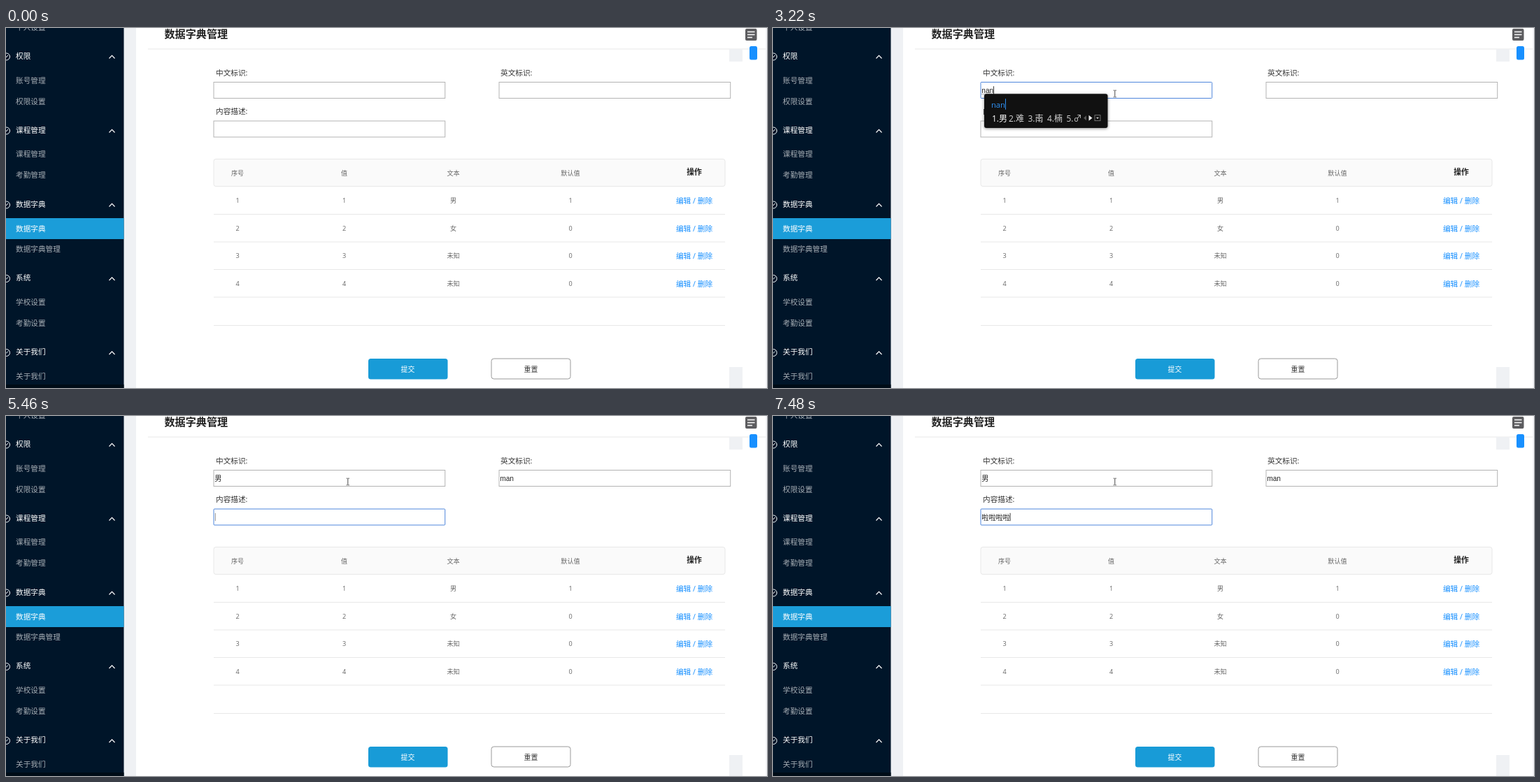
An HTML page that plays this animation: 1088x515 px, repeating every 8 s.

```html
<!DOCTYPE html>
<html lang="zh">
<head>
<meta charset="utf-8">
<title>数据字典管理</title>
<style>
  html, body { margin: 0; width: 100%; height: 100%; overflow: hidden; background: #fff; }
  svg { display: block; width: 100%; height: 100%; }
  text { font-family: "Open Sans", "Noto Sans CJK SC", "Noto Sans CJK", sans-serif; white-space: pre; }
  .input { font-family: "Liberation Sans", "Noto Sans CJK SC", "Noto Sans CJK", sans-serif; }
  .panel { filter: drop-shadow(0 1px 2px rgba(0, 0, 0, .45)); }
</style>
</head>
<body>
<svg id="stage" viewBox="0 0 1088 515" preserveAspectRatio="none"></svg>
<script>
const LOOP = 8000;
const stage = document.getElementById('stage');

const rect = (x, y, w, h, fill, extra = '') =>
  `<rect x="${x}" y="${y}" width="${w}" height="${h}" fill="${fill}" ${extra}/>`;
const hline = (x1, x2, y, color = '#e8e8e8') =>
  `<path d="M${x1} ${y}H${x2}" stroke="${color}"/>`;
// cy is the middle of the glyphs
const text = (x, cy, str, size, fill, extra = '') =>
  `<text x="${x}" y="${cy + size * 0.37}" font-size="${size}" fill="${fill}" ${extra}>${str}</text>`;
const centered = (x, cy, str, size, fill, extra = '') =>
  text(x, cy, str, size, fill, `text-anchor="middle" ${extra}`);

const menu = [
  ['权限', 40, ['账号管理', 75], ['权限设置', 105]],
  ['课程管理', 146, ['课程管理', 180], ['考勤管理', 210]],
  ['数据字典', 252, ['数据字典', 287], ['数据字典管理', 316]],
  ['系统', 357.5, ['学校设置', 392], ['考勤设置', 422]],
  ['关于我们', 463.5, ['关于我们', 498]]
];

function sidebar() {
  let s = rect(0, 0, 168.5, 515, '#001529') + rect(0, 510, 168.5, 5, '#000c17')
    + rect(0, 272, 168.5, 30, '#1b9dd9')
    + text(14, -1, '个人设置', 10.65, '#a6adb4');
  for (const [name, y, ...items] of menu) {
    const c = y + 1;
    s += text(14, y, name, 10.65, '#fff', 'font-weight="500"')
      + `<g fill="none" stroke="#fff"><circle cx="0.5" cy="${c}" r="5"/><path d="M0 ${c + 1}L3 ${c - 2}"/>`
      + `<path d="M147.5 ${c + 2.5}L151.5 ${c - 1.7}L155.5 ${c + 2.5}" stroke-width="1.2"/></g>`;
    for (const [label, iy] of items)
      s += text(14, iy, label, 10.65, iy === 287 ? '#fff' : '#a6adb4');
  }
  return s;
}

function table() {
  const cols = [331, 483.5, 639.5, 807];
  const rows = [
    [247, '1', '1', '男', '1'],
    [287, '2', '2', '女', '0'],
    [325.5, '3', '3', '未知', '0'],
    [366, '4', '4', '未知', '0']
  ];
  let s = rect(297, 187.5, 731, 39, '#fafafa', 'rx="3" stroke="#e8e8e8"');
  ['序号', '值', '文本', '默认值'].forEach((h, i) => s += centered(cols[i], 208, h, 9.1, '#666'));
  s += centered(984, 206.5, '操作', 10.8, '#222', 'font-weight="600"');
  rows.forEach(([y, ...cells], r) => {
    cells.forEach((c, i) => s += centered(cols[i], y, c, 9.1, '#666'));
    s += centered(984, 247.5 + r * 39.5, '编辑 / 删除', 10.7, '#1890ff')
      + hline(297, 1028, 266.5 + r * 39.5);
  });
  return s + hline(297, 1028, 425.5);
}

function page() {
  return rect(0, 0, 1088, 515, '#fff') + rect(168.5, 0, 17.5, 515, '#eff1f4')
    + text(226.5, 8.5, '数据字典管理', 15.1, '#222', 'font-weight="600"')
    + hline(203, 1086, 30) + '<path d="M1087 0V515" stroke="#e8eaee"/>'
    + rect(1034, 30, 19, 18, '#eff1f4') + rect(1034, 485, 19, 30, '#eff1f4')
    + rect(1057, 1, 16.5, 17, '#5c5c5f', 'rx="2"')
    + '<path d="M1060 5.5H1070.5M1060 9.5H1070.5M1060 13.5H1067" stroke="#fff" stroke-width="1.6"/>'
    + rect(1063, 26, 11, 19.5, '#1890ff', 'rx="2.5"')
    + text(300, 64, '中文标识:', 10.65, '#333') + text(707, 64, '英文标识:', 10.65, '#333')
    + text(300, 119, '内容描述:', 10.65, '#333')
    + table()
    + rect(518, 473, 113.5, 29.5, '#189bd7', 'rx="3.5"') + centered(574.5, 488.5, '提交', 9.9, '#fff')
    + rect(694, 473, 113, 29, '#fff', 'rx="3.5" stroke="#999"') + centered(750.5, 488.5, '重置', 9.9, '#333')
    + sidebar();
}

const fields = [{ x: 297, y: 77.5 }, { x: 705, y: 77.5 }, { x: 297, y: 133 }];

stage.innerHTML = page()
  + fields.map(f => rect(f.x, f.y, 330.7, 23, '#fff', 'class="box"')
    + `<text class="input" x="${f.x + 1.3}" y="${f.y + 15.8}" font-size="10.1" fill="#222"></text>`).join('')
  + '<path id="under" stroke="#333" stroke-width=".7" stroke-dasharray="1 1"/><path id="caret" stroke="#222" stroke-width=".9"/>'
  + '<g id="ime"></g><g id="mouse"><circle r="9.2" fill="#fdf850"/>'
  + '<path id="arrow" d="M0 0V12.5L2.9 9.8L4.8 14.2L6.8 13.3L4.9 9.1H8.9Z" fill="#fff" stroke="#222" stroke-width=".8"/>'
  + '<path id="beam" d="M-1.2 -4.8H.4M1.2 -4.8H2.8M.8 -4.4V4.4M-1.2 4.8H.4M1.2 4.8H2.8" fill="none" stroke="#333" stroke-width=".9"/></g>';

const $ = id => document.getElementById(id);
const boxes = stage.querySelectorAll('.box');
const inputs = stage.querySelectorAll('.input');
const show = (el, on) => el.setAttribute('visibility', on ? 'visible' : 'hidden');

// [time, field, value, caret on, composing, candidates, panel opacity]
const script = [
  [0, -1, '', 0],
  [2290, 0, '', 1],
  [2830, 0, '', 0],
  [2970, 0, 'n', 1, 1],
  [3050, 0, 'n', 1, 1, '你 能 那 年 呢'],
  [3130, 0, 'na', 1, 1, '那 哪 拿 呢 那个'],
  [3220, 0, 'nan', 1, 1, '男 难 南 楠 ♂'],
  [3510, 0, '男', 1, 0, '男 难 南 楠 ♂', 0.5],
  [3590, 0, '男', 1],
  [3890, 1, '', 1],
  [4440, 1, '', 0],
  [4610, 1, 'm', 1, 1, '吗 没 们 买 慢'],
  [4780, 1, 'ma', 1, 1, '吗 嘛 马 妈 骂'],
  [4840, 1, 'man', 1, 1, '蛮 慢 man 满 曼'],
  [5070, 1, 'man', 1, 0, '蛮 慢 man 满 曼', 0.5],
  [5140, 1, 'man', 1],
  [5460, 2, '', 1],
  [6010, 2, '', 0],
  [6550, 2, '', 1],
  [6870, 2, 'l', 1, 1, '了 来 里 啦 老'],
  [7020, 2, 'll', 1, 1, '啦啦 来了啦 啦啦啦 拉力赛 老老实'],
  [7180, 2, 'lll', 1, 1, '啦啦啦 拉拉链 来了啦 冷冷地 来来来来'],
  [7330, 2, 'llll', 1, 1, '啦啦啦啦 来来来来 拉拉拉拉 冷冷落落 啦啦啦啦啦'],
  [7480, 2, '啦啦啦啦', 1]
];

// [start, end, poses, x0, y0, x1, y1]; the pointer is hidden between moves
const moves = [
  [70, 130, 1, 965, 484, 965, 484],
  [460, 630, 2, 949, 470, 757, 346],
  [860, 1320, 6, 744, 332, 577, 179],
  [1550, 2270, 8, 563, 166, 488, 94]
];

function panel(f, typed, list, opacity) {
  const x = f.x + 5, y = f.y + 16.7;
  let px = x + 11, items = '';
  list.split(' ').forEach((word, i) => {
    const wide = word === '♂' ? 8.8 : [...word].reduce((w, c) => w + (c < '~' ? 7.8 : 12.3), 0);
    items += text(px, y + 35, `${i + 1}.${word}`, 12, i ? '#d4d4d4' : '#fff', i ? '' : 'font-weight="500"');
    px += wide + (i ? 15.2 : 11.7);
  });
  const cy = y + 34.5;
  $('ime').setAttribute('opacity', opacity);
  $('ime').innerHTML = rect(x, y, px + 35 - x, 48.8, '#111', 'rx="3" class="panel"')
    + text(x + 10, y + 15.3, typed, 11.2, '#2f93f5', 'id="typed"') + items
    + `<path d="M${px + 4.5} ${cy - 3.5}V${cy + 3.5}L${px + 0.5} ${cy}Z" fill="#555"/>`
    + `<path d="M${px + 8} ${cy - 4}V${cy + 4}L${px + 13} ${cy}Z" fill="#eee"/>`
    + rect(px + 16.5, cy - 4, 8, 8, 'none', 'stroke="#888" stroke-width=".8"')
    + `<path d="M${px + 18.5} ${cy - 1}H${px + 22.5}L${px + 20.5} ${cy + 1.5}Z" fill="#ccc"/>`;
  const cx = x + 10.5 + $('typed').getComputedTextLength();
  $('ime').innerHTML += `<path d="M${cx} ${y + 7}V${y + 22.5}" stroke="#2f93f5"/>`;
}

let shown = -1;
function form(index) {
  if (index === shown) return;
  shown = index;
  const [, active, value, caret, composing, list, opacity = 1] = script[index];
  const values = ['', '', ''];
  script.slice(0, index + 1).forEach(s => { if (s[1] >= 0) values[s[1]] = s[2]; });
  fields.forEach((f, i) => {
    boxes[i].setAttribute('stroke', i === active ? '#4f86dc' : '#b3b3b3');
    boxes[i].setAttribute('rx', i === active ? 1 : 0);
    inputs[i].textContent = values[i];
  });
  show($('caret'), caret);
  show($('under'), composing);
  $('ime').innerHTML = '';
  if (active < 0) return;
  const f = fields[active];
  const end = f.x + 2.3 + (value ? inputs[active].getComputedTextLength() - 0.6 : 0);
  $('caret').setAttribute('d', `M${end} ${f.y + 5.8}v11.4`);
  $('caret').setAttribute('stroke', value ? '#222' : '#888');
  $('under').setAttribute('d', `M${f.x + 1.3} ${f.y + 17.2}H${end}`);
  if (list) panel(f, value, list, opacity);
}

function pointer(t) {
  const last = moves.length - 1;
  const i = moves.findIndex(([a, b], n) => t >= a && (t < b || n === last));
  show($('mouse'), i >= 0);
  if (i < 0) return;
  const [a, b, n, x0, y0, x1, y1] = moves[i];
  const k = Math.min(n - 1, Math.floor((t - a) / (b - a) * n));
  const u = n > 1 ? k / (n - 1) : 0;
  const e = i === last ? 1 - (1 - u) ** 2 : u;
  const x = x0 + (x1 - x0) * e, y = y0 + (y1 - y0) * e;
  const overInput = fields.some(f => x > f.x && x < f.x + 331 && y > f.y && y < f.y + 23);
  $('mouse').setAttribute('transform', `translate(${x} ${y})`);
  $('mouse').firstChild.setAttribute('opacity', t < 2420 ? 1 : 0);
  $('arrow').setAttribute('opacity', overInput ? 0 : 1);
  $('beam').setAttribute('opacity', overInput ? 1 : 0);
}

function draw(t) {
  form(script.findLastIndex(s => t >= s[0]));
  pointer(t);
}

const start = performance.now();
function tick() {
  draw((performance.now() - start) % LOOP);
  requestAnimationFrame(tick);
}
tick();
</script>
</body>
</html>
```
